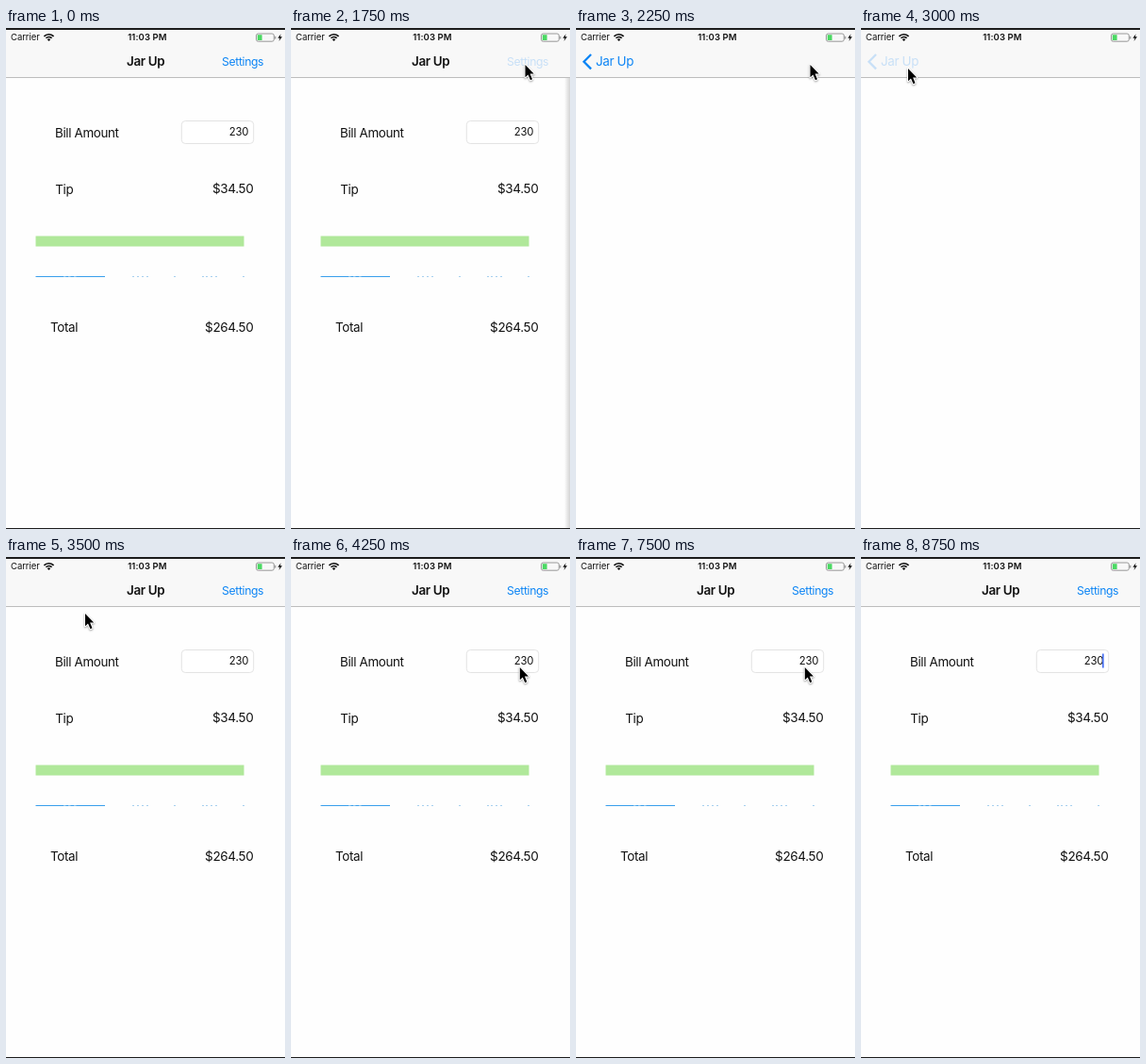
Animation of 296x531 px, one loop 9.25 s. Source, as an HTML page with a canvas:

```html
<!DOCTYPE html>
<html lang="en">
<head>
<meta charset="utf-8">
<title>Tip calculator</title>
<style>
html, body { margin: 0; width: 100%; height: 100%; overflow: hidden; background: #fff; }
canvas { display: block; width: 100%; height: 100%; }
</style>
</head>
<body>
<canvas id="stage"></canvas>
<script>
const W = 296, H = 531, LOOP = 9250, STEP = 250, BAR = 53;
const BLUE = '#0b84f5', INK = '#111', APP = 'Jar Up';
const canvas = document.getElementById('stage');
const ctx = canvas.getContext('2d');
const ratio = window.devicePixelRatio || 1;
canvas.width = Math.round(W * ratio);
canvas.height = Math.round(H * ratio);

// Pointer path: time, x, y
const path = [
  [1000, 282, 150], [1250, 264, 84], [1500, 248.5, 39], [2250, 248.5, 39],
  [2750, 66, 50], [3000, 50, 43], [3250, 50, 43], [3500, 84, 60],
  [4000, 232, 113], [4250, 242.8, 117], [7500, 242.8, 117], [8000, 297, 170]
];

const mix = (a, b, k) => a + (b - a) * k;

function rect(x, y, w, h, fill) {
  ctx.fillStyle = fill;
  ctx.fillRect(x, y, w, h);
}

function text(str, x, y, size, { color = INK, weight = 400, align = 'left', gap = -0.35, alpha = 1 } = {}) {
  ctx.save();
  ctx.globalAlpha *= alpha;
  ctx.font = `${weight} ${size}px Inter, Roboto, sans-serif`;
  ctx.letterSpacing = gap + 'px';
  ctx.textAlign = align;
  ctx.fillStyle = color;
  ctx.fillText(str, x, y);
  ctx.restore();
}

function poly(points, close) {
  ctx.beginPath();
  points.forEach(([x, y]) => ctx.lineTo(x, y));
  if (close) ctx.closePath();
}

function drawStatus() {
  text('Carrier', 5, 13.4, 9.5, { gap: -0.05 });
  text('11:03 PM', 149.9, 13.4, 9.5, { weight: 600, align: 'center', gap: 0.1 });

  // Wi-Fi
  ctx.strokeStyle = ctx.fillStyle = INK;
  ctx.lineWidth = 1.6;
  for (const r of [4.2, 7]) {
    ctx.beginPath();
    ctx.arc(45.5, 13.7, r, -Math.PI * 0.76, -Math.PI * 0.24);
    ctx.stroke();
  }
  ctx.beginPath();
  ctx.moveTo(45.5, 13.9);
  ctx.arc(45.5, 13.9, 2.4, -Math.PI * 0.76, -Math.PI * 0.24);
  ctx.fill();

  // Battery
  ctx.strokeStyle = '#8d8d8d';
  ctx.lineWidth = 0.9;
  ctx.beginPath();
  ctx.roundRect(265.5, 6, 18.8, 8.2, 2);
  ctx.stroke();
  rect(266.8, 7.2, 4.8, 5.8, '#4cd964');
  rect(285.2, 8.8, 1.1, 2.8, '#8d8d8d');
  ctx.fillStyle = INK;
  poly([[291.6, 6.2], [288.4, 10.7], [290.5, 10.7], [289.6, 14], [293, 9.3], [290.9, 9.3]], true);
  ctx.fill();
}

function drawForm(caret) {
  rect(0, BAR, W, H, '#fefefe');
  text('Bill Amount', 52, 115.7, 13.4);
  text('Tip', 52.2, 175.7, 13.4);
  text('$34.50', 262.4, 175.2, 13.5, { align: 'right' });
  text('Total', 47, 322.2, 13.4);
  text('$264.50', 262.4, 322.2, 13.5, { align: 'right' });

  ctx.strokeStyle = '#e0e0e0';
  ctx.lineWidth = 0.9;
  ctx.beginPath();
  ctx.roundRect(186.3, 98.5, 76.4, 24, 4);
  ctx.fillStyle = '#fff';
  ctx.fill();
  ctx.stroke();
  text('230', 257.4, 114.3, 11.3, { align: 'right', gap: -0.1 });
  if (caret) {
    ctx.save();
    ctx.globalAlpha *= caret;
    rect(256, 102.5, 1.6, 15, '#426bf2');
    ctx.restore();
  }

  rect(31.5, 220.5, 221, 11, '#b0e89a');

  // Collapsed segmented control with slivers of its labels
  rect(31.5, 263, 73.5, 1, '#3a9fec');
  for (const x of [61, 66, 72]) rect(x, 263, 2.5, 0.7, '#a8d4f4');
  for (const x of [134, 139, 144, 149, 178, 208, 212, 217, 222, 251]) {
    rect(x, 263, 2, 0.9, '#9ecbee');
  }
}

function drawNav(p, pressed, back) {
  rect(0, 0, W, BAR, '#f8f8f8');
  rect(0, 52, W, 1, '#bdbdbd');
  drawStatus();

  const x = mix(128, 21, p);
  const home = back ? 1 - p : Math.max(0, 1 - p * 1.6);
  const away = back ? Math.max(0, p * 2 - 1) : Math.min(1, p * 1.6);
  text(APP, x, 40.3, 13.4, { weight: 600, alpha: home });
  text('Settings', 273.2, 39.8, 12.2, {
    color: BLUE, align: 'right', alpha: home * (pressed && !back ? 0.2 : 1)
  });

  ctx.save();
  ctx.globalAlpha = away * (pressed && back ? 0.2 : 1);
  text(APP, x, 40.3, 13.4, { color: BLUE });
  ctx.strokeStyle = BLUE;
  ctx.lineWidth = 2.3;
  poly([[16, 28], [8.4, 35.7], [16, 43.4]]);
  ctx.stroke();
  ctx.restore();
}

function drawPages(p, caret, moving) {
  const edge = mix(W, 0, p);
  ctx.save();
  ctx.translate(-0.3 * W * p, 0);
  drawForm(caret);
  ctx.restore();
  if (!moving && p === 0) return;

  rect(0, BAR, edge, H, `rgba(0,0,0,${0.1 * p})`);
  const shade = ctx.createLinearGradient(edge - 6, 0, edge, 0);
  shade.addColorStop(0, 'rgba(0,0,0,0)');
  shade.addColorStop(1, `rgba(0,0,0,${0.17 * (1 - p)})`);
  rect(edge - 6, BAR, 6, H, shade);
  rect(edge, BAR, W, H, '#fefefe');
}

function drawPointer(t) {
  const i = path.findIndex(point => point[0] > t);
  if (i < 1) return;
  const [t0, x0, y0] = path[i - 1], [t1, x1, y1] = path[i];
  const k = (t - t0) / (t1 - t0);
  ctx.save();
  ctx.translate(mix(x0, x1, k), mix(y0, y1, k));
  poly([[0, 0], [0, 13.2], [3, 10.4], [5.5, 16.2], [7.5, 15.3], [5.1, 9.6], [9.2, 9.4]], true);
  ctx.lineJoin = 'round';
  ctx.lineWidth = 2.2;
  ctx.strokeStyle = '#fff';
  ctx.shadowColor = 'rgba(0,0,0,0.35)';
  ctx.shadowBlur = 2 * ratio;
  ctx.shadowOffsetY = ratio;
  ctx.stroke();
  ctx.shadowColor = 'transparent';
  ctx.fillStyle = '#000';
  ctx.fill();
  ctx.restore();
}

// Share of the settings page on screen
function pushed(t) {
  if (t < 2000 || t >= 3500) return 0;
  if (t < 2250) return 0.93;
  return t < 3250 ? 1 : 0.07;
}

function caretAlpha(t) {
  if (t < 4750) return 0;
  const phase = (t - 4750) % 1000;
  return phase < 500 ? 1 : phase < 750 ? 0.3 : 0;
}

function frame(now) {
  const t = Math.floor((now % LOOP) / STEP) * STEP;
  const p = pushed(t);
  const opening = t === 1750, closing = t === 3000;
  ctx.setTransform(canvas.width / W, 0, 0, canvas.height / H, 0, 0);
  drawPages(p, caretAlpha(t), opening);
  drawNav(p, opening || closing, t >= 3000);
  rect(0, 0, W, 2, '#1c1c1c');
  rect(0, 530, W, 1, '#1c1c1c');
  drawPointer(t);
}

const start = performance.now();
function tick() {
  frame(performance.now() - start);
  requestAnimationFrame(tick);
}
tick();
</script>
</body>
</html>
```
